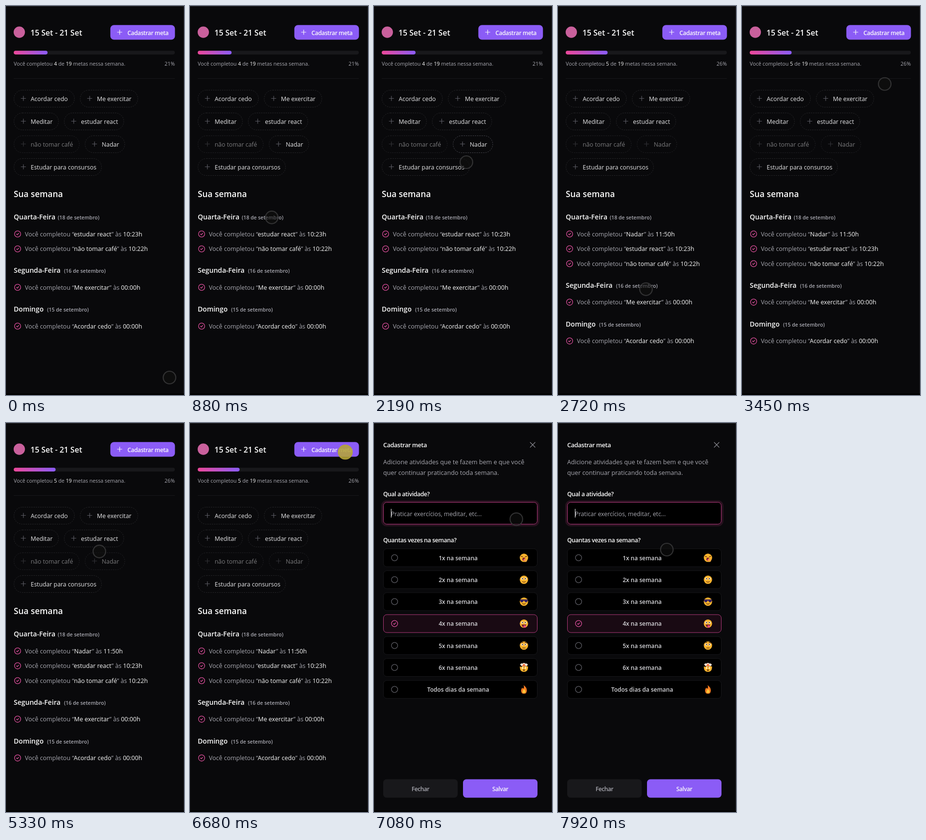
An HTML page that plays this animation: 368 by 802 pixels, repeating every 7990 ms.

```html
<!DOCTYPE html>
<html lang="pt-BR">
<head>
<meta charset="utf-8">
<title>Metas da semana</title>
<style>
  html, body { margin: 0; width: 100%; height: 100%; overflow: hidden; background: #09090b; }
  svg { display: block; width: 368px; height: 802px; font-family: "Open Sans", "Noto Sans", sans-serif; }
  text { white-space: pre; }
  .b { font-weight: 600; }
  .tight { font-weight: 600; letter-spacing: -.4px; }
  .line { fill: none; stroke-linecap: round; stroke-linejoin: round; }
</style>
</head>
<body>
<svg id="stage" viewBox="0 0 368 802"></svg>
<script>
const LOOP = 7990, DONE = 2260, OPEN = 6820;
const PINK = '#db4f9b', VIOLET = '#8b5cf6', WHITE = '#fafafa', GREY = '#a9a9b1';

const text = (x, y, size, fill, body, extra = '') =>
  `<text x="${x}" y="${y}" font-size="${size}" fill="${fill}" ${extra}>${body}</text>`;
const rect = (x, y, w, h, r, fill, extra = '') =>
  `<rect x="${x}" y="${y}" width="${w}" height="${h}" rx="${r}" fill="${fill}" ${extra}/>`;
const line = (d, color, w = 1.2) =>
  `<path class="line" d="${d}" stroke="${color}" stroke-width="${w}"/>`;
const ring = (x, y, color) =>
  `<circle cx="${x}" cy="${y}" r="6.4" fill="none" stroke="${color}" stroke-width="1.3"/>`;
const plus = (x, y, color) => line(`M${x - 4.7} ${y}h9.4M${x} ${y - 4.7}v9.4`, color);
const check = (x, y) => ring(x, y, PINK) + line(`M${x - 2.2} ${y + .2}l1.5 1.5 3-3.2`, PINK, 1.3);
const white = s => `<tspan fill="${WHITE}">${s}</tspan>`;

// Main page
const chips = [
  { x: 16, y: 173, w: 126, label: 'Acordar cedo' },
  { x: 153, y: 173, w: 120, label: 'Me exercitar' },
  { x: 16, y: 220, w: 93, label: 'Meditar' },
  { x: 120, y: 220, w: 124, label: 'estudar react' },
  { x: 16, y: 267, w: 136, label: 'não tomar café', off: 0 },
  { x: 163, y: 267, w: 83, label: 'Nadar', off: DONE },
  { x: 16, y: 314, w: 182, label: 'Estudar para consursos' }
];
const chip = c => `<g class="chip">
  ${rect(c.x + .5, c.y + .5, c.w - 1, 35, 17.5, 'none', 'stroke-dasharray="2.6 2"')}
  ${plus(c.x + 20, c.y + 17.5, '#5b5b63')}
  ${text(c.x + 35, c.y + 22.7, 12.4, '#e8e8ea', c.label)}</g>`;
const entry = (y, goal, time) => check(24, y) +
  text(39, y + 4.7, 12.58, GREY, `Você completou “${white(goal)}” às ${white(time)}`);
const day = (y, name, x, date) => text(16, y + 5, 14.1, WHITE, name, 'class="b"') +
  text(x, y + 5, 10.6, GREY, `(${date} de setembro)`, 'class="b"');

const page = `<g id="page">
  <circle cx="27.5" cy="54" r="11.7" fill="#c9609c"/>
  ${text(50.5, 61, 16, WHITE, '15 Set - 21 Set', 'class="b"')}
  ${rect(215.7, 39.2, 133.6, 30.4, 7.6, VIOLET)}
  ${plus(235, 54, WHITE)}
  ${text(251, 59.6, 12.1, WHITE, 'Cadastrar meta', 'class="tight"')}
  ${rect(16, 92.3, 333, 7.6, 3.8, '#18181b')}
  ${rect(16, 92.3, 70, 7.6, 3.8, 'url(#bar)', 'id="bar-fill"')}
  ${text(16, 123, 10.76, GREY, `Você completou <tspan id="count" fill="${WHITE}">4</tspan> de ${white(19)} metas nessa semana.`)}
  ${text(349, 123, 10.76, GREY, '21%', 'id="percent" text-anchor="end"')}
  ${rect(16, 149, 333, 1, 0, '#18181b')}
  ${chips.map(chip).join('')}
  ${text(16, 394, 17.4, WHITE, 'Sua semana', 'class="b"')}
  ${day(435, 'Quarta-Feira', 107, 18)}
  <g id="fresh">${entry(470, 'Nadar', '11:50h')}</g>
  <g id="rest">
    ${entry(470, 'estudar react', '10:23h')}
    ${entry(500.7, 'não tomar café', '10:22h')}
    ${day(545, 'Segunda-Feira', 120, 16)}
    ${entry(580, 'Me exercitar', '00:00h')}
    ${day(625, 'Domingo', 85, 15)}
    ${entry(660, 'Acordar cedo', '00:00h')}
  </g></g>`;

// Dialog
const dot = (x, y, r, color) => `<circle cx="${x}" cy="${y}" r="${r}" fill="${color}"/>`;
const face = dot(0, 0, 8.6, '#fbb32c');
const eyes = dot(-3, -2, 1.3, '#4a2b12') + dot(3, -2, 1.3, '#4a2b12');
const bigEyes = dot(-3.3, -2, 2.4, '#fff') + dot(3.3, -2, 2.4, '#fff') + eyes;
const mouth = d => line(d, '#5b2c12', 1.3);
const emojis = [
  face + mouth('M-6-3l3.5 1M6-3l-3.5 1') + dot(0, 3, 3.2, '#7a2030') + dot(3, 5, 3.6, '#f2a43a') + dot(0, 4.2, 1.6, '#ee4a78'),
  face + bigEyes + mouth('M-3 4q3 2 6 0'),
  face + `<path d="M-8.5-4.5h17l-1.5 5q-3 2-5 0l-2-3-2 3q-2 2-5 0z" fill="#39245e"/>` + mouth('M-3 4q3 2.5 6 0'),
  face + bigEyes + `<path d="M-5 2H5Q3 8 0 8-4 7-5 2z" fill="#702030"/>` + dot(1.5, 6, 2.5, '#ed4a7c'),
  face + bigEyes + mouth('M-3 5h6M-5-6l3-.5M2-6q2-1 4 1'),
  `<path d="M-8-6Q-6-10-3-8q3-3 6 0 4-1 5 3L4-2h-8z" fill="#f3dfd2"/><path d="M-4-3L0-8 4-3z" fill="#f0662c"/>` +
    `<path d="M-8.4-2l4 1 2-2 3 2 3-2 4.8 1Q9 9 0 9T-8.4-2z" fill="#fbb32c"/>` + dot(-3, 1, 1.5, '#fff') + dot(3, 1, 1.5, '#fff') + dot(0, 5.5, 1.7, '#5b2c12'),
  `<path d="M-1-9Q6-4 6 2 6 9 0 9T-6 2Q-6-1-3-4-3-1-1-2 1-5-1-9z" fill="#f47a20"/><path d="M0-1Q4 3 3 6 0 9-3 6-3 3 0-1z" fill="#ffc83a"/>`
];
const option = (emoji, i) => {
  const y = 277.8 + i * 45.25, on = i === 3;
  const label = i < 6 ? `${i + 1}x na semana` : 'Todos dias da semana';
  return rect(19.5, y - 18.5, 318, 37, 7, on ? '#190a13' : '#000', `stroke="${on ? '#b13a7b' : '#18181b'}"`) +
    (on ? check(42.5, y) : ring(42.5, y, '#5b5b62')) +
    text(174, y + 4.7, 12.1, '#d4d4d8', label, 'class="b" text-anchor="middle"') +
    `<g transform="translate(310 ${y})">${emoji}</g>`;
};
const dialog = `<g id="dialog">
  ${text(19, 50, 12.8, WHITE, 'Cadastrar meta', 'class="tight"')}
  ${line('M323 40l10 10m0-10l-10 10', '#8b8b93')}
  ${text(19, 85, 12.71, GREY, 'Adicione atividades que te fazem bem e que você')}
  ${text(19, 107, 12.71, GREY, 'quer continuar praticando toda semana.')}
  ${text(19, 151, 12.4, WHITE, 'Qual a atividade?', 'class="tight"')}
  ${rect(17, 161.5, 323, 49.5, 9, 'none', 'stroke="#ec4899" stroke-opacity=".13" stroke-width="4"')}
  ${rect(19.5, 163.5, 318, 45, 7, '#000', 'stroke="#b83a80"')}
  ${text(35, 191.7, 12.32, GREY, 'Praticar exercícios, meditar, etc...')}
  ${rect(35, 177, 1, 18, 0, WHITE, 'id="caret"')}
  ${text(19, 246, 12.4, WHITE, 'Quantas vezes na semana?', 'class="tight"')}
  ${emojis.map(option).join('')}
  ${rect(19, 734.5, 154, 38, 7, '#18181b')}
  ${text(96, 759, 12, GREY, 'Fechar', 'class="tight" text-anchor="middle"')}
  ${rect(184, 734.5, 154, 38, 7, VIOLET)}
  ${text(261, 759, 12, WHITE, 'Salvar', 'class="tight" text-anchor="middle"')}
  </g>`;

const stage = document.getElementById('stage');
stage.innerHTML = `<defs><linearGradient id="bar">
    <stop stop-color="#ec4899"/><stop offset="1" stop-color="${VIOLET}"/></linearGradient></defs>
  ${rect(0, 0, 368, 802, 0, '#09090b')}${page}${dialog}
  ${rect(0, 0, 368, 1, 0, '#2b2b2e')}${rect(367, 0, 1, 802, 0, '#1d1d20')}${rect(0, 799, 368, 3, 0, '#000')}
  <circle id="pointer" stroke-width="2.2"/>`;

// Pointer path: time, x, y
const keys = [
  [0, 338, 766], [60, 338, 766], [550, 155, 363], [820, 170, 444], [880, 169, 436],
  [1080, 155, 400], [1430, 208, 304], [1520, 203, 297], [2080, 203, 297], [2190, 191, 322],
  [2380, 191, 318], [2800, 181, 611], [3180, 223, 318], [3450, 295, 161], [3990, 311, 71],
  [4180, 306, 63], [4320, 306, 62], [4450, 304, 62], [4850, 304, 62], [5140, 225, 329],
  [5330, 193, 265], [5600, 204, 240], [6010, 69, 242], [6200, 69, 242], [6650, 321, 60],
  [6820, 321, 60], [7120, 293, 205], [7340, 293, 205], [7620, 250, 532], [7920, 225, 261], [7990, 225, 261]
];
const slope = (i, k) => i < 0 || i > keys.length - 2 ? 0 :
  (keys[i + 1][k] - keys[i][k]) / (keys[i + 1][0] - keys[i][0]);
// Monotone tangent: no overshoot past a key
const tangent = (i, k) => {
  const a = slope(i - 1, k), b = slope(i, k);
  return a * b <= 0 ? 0 : 2 * a * b / (a + b);
};
function pointerAt(t) {
  let i = 0;
  while (i < keys.length - 2 && keys[i + 1][0] <= t) i++;
  const span = keys[i + 1][0] - keys[i][0];
  const u = Math.max(0, t - keys[i][0]) / span, v = 1 - u;
  return [1, 2].map(k =>
    v * v * (1 + 2 * u) * keys[i][k] + u * u * (3 - 2 * u) * keys[i + 1][k] +
    span * u * v * (v * tangent(i, k) - u * tangent(i + 1, k)));
}

const $ = id => document.getElementById(id);
const show = (id, on) => $(id).setAttribute('display', on ? 'inline' : 'none');
const chipNodes = [...document.querySelectorAll('.chip')];

function draw(t) {
  const done = t >= DONE, open = t >= OPEN;
  show('page', !open);
  show('dialog', open);
  show('fresh', done);
  show('caret', Math.floor((t - OPEN) / 530) % 2 === 0);
  $('rest').setAttribute('transform', `translate(0 ${done ? 30.6 : 0})`);
  $('bar-fill').setAttribute('width', 333 * (done ? .26 : .21));
  $('count').textContent = done ? 5 : 4;
  $('percent').textContent = done ? '26%' : '21%';

  // Hover trails the drawn pointer slightly
  const [hx, hy] = pointerAt(t - 120);
  chips.forEach((c, i) => {
    const off = t >= c.off;
    const hot = !off && hx > c.x && hx < c.x + c.w && hy > c.y && hy < c.y + 36;
    chipNodes[i].setAttribute('opacity', off ? .5 : 1);
    chipNodes[i].firstElementChild.setAttribute('stroke', hot ? '#46464d' : off ? '#38383d' : '#27272a');
  });

  const [x, y] = pointerAt(t);
  const down = t >= 1580 && t < 1730 || t >= 6660 && t < OPEN;
  const p = $('pointer');
  p.setAttribute('cx', x);
  p.setAttribute('cy', y);
  p.setAttribute('r', down ? 14.4 : 13);
  p.setAttribute('fill', down ? 'rgba(180,164,56,.88)' : 'rgba(16,16,17,.55)');
  p.setAttribute('stroke', down ? 'rgba(180,164,56,.88)' : 'rgba(56,56,57,.88)');
}

function tick() {
  draw(performance.now() % LOOP);
  requestAnimationFrame(tick);
}
tick();
</script>
</body>
</html>
```
